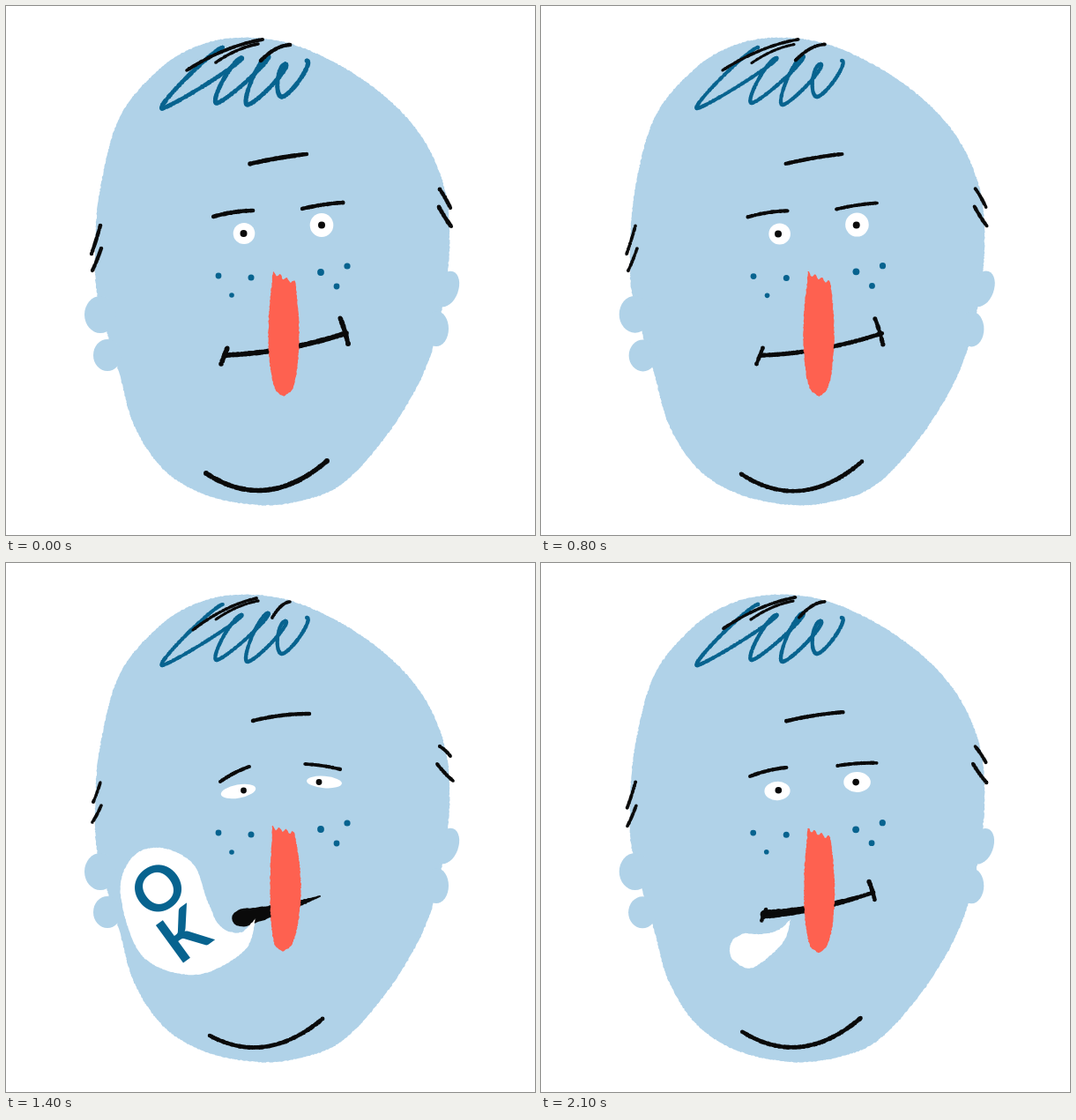
These frames come from a looping animation (600 px wide and 600 px high, 2.2 s). An HTML page with a canvas:

```html
<!DOCTYPE html>
<html lang="en">
<head>
<meta charset="utf-8">
<title>OK</title>
<style>
html, body { margin: 0; width: 100%; height: 100%; overflow: hidden; background: #fff; }
canvas { display: block; width: 600px; height: 600px; }
</style>
</head>
<body>
<canvas id="stage" width="600" height="600"></canvas>
<script>
const ctx = document.getElementById('stage').getContext('2d');
const SKIN = '#b0d2e8', BLUE = '#07638f', RED = '#fe6150', INK = '#0a0a0a', WHITE = '#fff';
const STEP = 100, LOOP = 2200, { PI, sin, cos, hypot } = Math;

let seed = 1, boil = 0, talk = 0, pen = 1;

function rnd() {
  seed = (seed * 16807) % 2147483647;
  return seed / 2147483647;
}
const jit = a => (rnd() * 2 - 1) * a;
const mix = (a, b, t) => a + (b - a) * t;
const L = (calm, speak) => mix(calm, speak, talk);

// Closed smooth shape through key points; a repeated point makes a corner
function blob(keys, color, rough = 0.35) {
  const n = keys.length, at = i => keys[(i + n) % n];
  ctx.fillStyle = color;
  ctx.beginPath();
  for (let i = 0; i < n; i++) {
    const [a, b, c, d] = [at(i - 1), at(i), at(i + 1), at(i + 2)];
    const m = Math.ceil(hypot(c[0] - b[0], c[1] - b[1]) / 1.5);
    for (let k = 0; k < m; k++) {
      const t = k / m;
      const [x, y] = [0, 1].map(j => b[j] + t / 2 * (c[j] - a[j] +
        t * (2 * a[j] - 5 * b[j] + 4 * c[j] - d[j] + t * (3 * (b[j] - c[j]) + d[j] - a[j]))));
      ctx.lineTo(x + jit(rough), y + jit(rough));
    }
  }
  ctx.fill();
}

function oval(x, y, rx, ry, turn, color) {
  ctx.fillStyle = color;
  ctx.beginPath();
  ctx.ellipse(x + jit(boil / 3), y + jit(boil / 3), rx, ry, turn, 0, 2 * PI);
  ctx.fill();
}
const dot = (x, y, r, color) => oval(x, y, r, r, 0, color);

// Crayon: a trail of uneven discs along path(t), from width w1 to w2
function crayon(path, len, w1, w2, color) {
  ctx.fillStyle = color;
  ctx.beginPath();
  for (let s = 0; s <= len; s++) {
    const t = s / len, [x, y] = path(t);
    const r = mix(w1, w2, t) / 2 * (0.88 + 0.24 * rnd());
    ctx.moveTo(x + r, y);
    ctx.arc(x, y, r, 0, 2 * PI);
  }
  ctx.fill();
}

// Line from a to b, pushed down by bend at its middle
function stroke(ax, ay, bx, by, w = 4.2, bend = 0, w2 = w) {
  const dx = jit(boil / 2), dy = jit(boil / 2);
  const path = t => [mix(ax, bx, t) + dx, mix(ay, by, t) + 4 * bend * t * (1 - t) + dy];
  crayon(path, Math.ceil(hypot(bx - ax, by - ay)) + 1, w * pen, w2 * pen, INK);
}

function head() {
  blob([[262, 36], [320, 42], [380, 68], [435, 107], [474, 152], [497, 205], [503, 255], [500, 310],
    [486, 382], [463, 438], [425, 496], [380, 543], [335, 561], [285, 566], [225, 554], [178, 525],
    [145, 475], [128, 415], [105, 335], [101, 285], [106, 212], [128, 128], [170, 75], [213, 47]], SKIN, 0.5);
  oval(107, 350, 18, 21, 0, SKIN);
  oval(115, 396, 16, 18, 0, SKIN);
  oval(500, 321, 13, 21, 0.35, SKIN);
  oval(488, 366, 14, 20, 0, SKIN);
}

// Handwritten loops: swing between tops and bottoms, left going down, right going up
function hair() {
  const turns = [[246, 47], [177, 116], [267, 59], [239, 110], [297, 57], [274, 112], [317, 66], [313, 103], [341, 62]];
  for (let i = 0; i < turns.length - 1; i++) {
    const [ax, ay] = turns[i], [bx, by] = turns[i + 1], side = i % 2 ? 7 : -7;
    const path = t => {
      const e = (1 - cos(PI * t)) / 2;
      return [mix(ax, bx, e) + side * sin(PI * t), mix(ay, by, e)];
    };
    crayon(path, 90, 4.3 * pen, 4.3 * pen, BLUE);
  }
  stroke(L(205, 212), L(73, 76), L(291, 284), L(38, 40), 3.6, -5);
  stroke(238, 64, 286, 43, 3.2, -3);
  stroke(L(289, 302), 62, 322, 44, 3.8, -4);
}

function marks() {
  stroke(L(277, 280), 179, L(341, 344), L(168, 171), 4.4, L(-1, -2));
  stroke(107, 249, L(97, 99), L(281, 271), 3.8, 1);
  stroke(108, 275, 98, L(300, 294), 3.8, 1);
  stroke(492, 208, 504, L(229, 219), 4, -1);
  stroke(L(491, 489), 228, L(505, 507), L(250, 247), 4.2, 1);
  stroke(L(227, 231), L(530, 536), L(364, 359), L(516, 517), 4.8, L(26, 22));
  stroke(L(235, 243), L(239, 248), L(280, 276), L(232, 231), 4.2, -1.5);
  stroke(L(336, 339), L(230, 228), L(382, 379), L(223, 234), 4, -1);
}

function eyes() {
  oval(L(270, 263.5), L(258, 259), L(12.3, 20), L(12, 7.5), L(0, -0.18), WHITE);
  oval(L(358, 361), 248.5, L(13.3, 20), L(13.5, 6.7), L(0, 0.08), WHITE);
  dot(269.5, 258, L(4, 3.4), INK);
  dot(L(358, 355), 248.5, L(4, 3.4), INK);
}

function freckles() {
  for (const [x, y, r] of [[241, 306, 3.4], [278, 308, 3.5], [256, 328, 2.8], [357, 302, 3.9], [387, 295, 3.6], [375, 318, 3.4]])
    dot(x, y, r, BLUE);
}

function mouth() {
  const ax = L(248, 265), ay = L(396, 403), bx = L(386, 356), by = L(371, 378);
  stroke(ax, ay, bx, by, L(5, 20), L(5, 2), L(5, 2));
  const k = 1 - talk;
  if (k === 0) return;
  stroke(ax + 3 * k, ay - 8 * k, ax - 4 * k, ay + 10 * k, 4.6);
  stroke(bx - 7 * k, by - 17 * k, bx + 2 * k, by + 12 * k, 4.8, -2 * k);
}

function nose() {
  const top = L(301, 298), foot = L(443, 441), jag = [], right = [], left = [];
  for (let i = 0; i < 7; i++) jag.push([303 + i * 3.9 - L(0, 1), top + i * L(1.7, 1) + (i % 2) * 4]);
  for (let i = 2; i <= 24; i++) {
    const v = i / 24, y = mix(top, foot, v);
    const half = (11.5 + 6 * sin(PI * v)) * Math.sqrt(1 - v ** 14);
    const mid = 315 + L(0, 3 * sin(PI * v) - 1);
    right.push([mid + half, y]);
    left.unshift([mid - half, y]);
  }
  blob([...jag, ...right, ...left], RED, 0.5);
}

function letter(ch, x, y, size) {
  ctx.save();
  ctx.translate(x, y);
  ctx.rotate(-0.63);
  ctx.font = `bold ${size}px Lato, "Open Sans", sans-serif`;
  ctx.textAlign = 'center';
  ctx.fillStyle = BLUE;
  ctx.fillText(ch, 0, size * 0.36);
  ctx.restore();
}

function bubble() {
  const small = [[214, 440], [217, 428], [224, 423], [232, 420], [245, 421], [262, 419], [274, 413],
    [283, 404], [283, 404], [274, 431], [240, 459], [219, 451]];
  const big = [[130, 376], [143, 334], [175, 323], [212, 341], [228, 382], [243, 412], [266, 419],
    [283, 403], [283, 403], [270, 440], [215, 467], [155, 446]];
  const grow = (talk - 0.3) / 0.7;
  blob(small.map((p, i) => p.map((v, j) => mix(v, big[i][j], grow))), WHITE);
  if (grow <= 0) return;
  letter('O', mix(232, 172.5, grow), mix(436, 369, grow), 71 * grow);
  letter('K', mix(240, 201, grow), mix(442, 421, grow), 73 * grow);
}

function draw(step) {
  // Two steps of opening, a held "OK", two steps of closing
  const stage = Math.max(0, Math.min(3, step - 8, 22 - step));
  talk = [0, 0.3, 0.65, 1][stage];
  boil = step % 11 % 3;
  pen = L(1.12, 0.98) - 0.07 * boil;
  seed = 4177 + boil * 911;
  ctx.fillStyle = WHITE;
  ctx.fillRect(0, 0, 600, 600);
  head();
  hair();
  marks();
  eyes();
  freckles();
  mouth();
  nose();
  if (talk) bubble();
}

let last = -1;
function tick() {
  const step = Math.floor(performance.now() % LOOP / STEP);
  if (step !== last) draw(last = step);
  requestAnimationFrame(tick);
}
tick();
</script>
</body>
</html>
```
